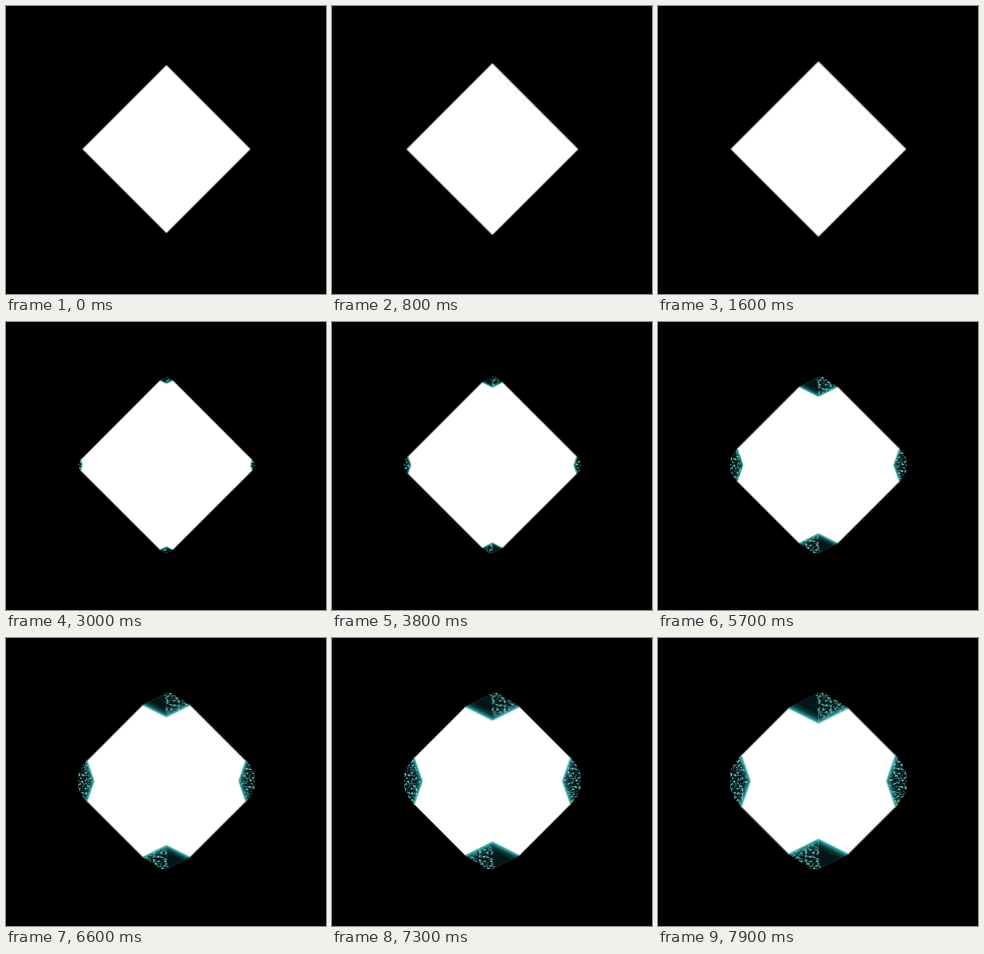
These frames come from a looping animation (320 by 288 pixels, 8000 ms). An HTML page without scripts:

```html
<!DOCTYPE html>
<html lang="en">
<head>
<meta charset="utf-8">
<title>Folding diamond</title>
<style>
  html, body { margin: 0; width: 100%; height: 100%; overflow: hidden; background: #000; }
  svg { display: block; width: 100vw; height: 100vh; }
  .diamond { fill: #fff; animation: swell 8s steps(80, end) infinite; }
  .fold { animation: fold 8s infinite; }
  .seam { fill: none; stroke: #2b8583; stroke-width: .8; stroke-dasharray: 1 2; vector-effect: non-scaling-stroke; }
  @keyframes swell { from { transform: scale(84); } to { transform: scale(103); } }
  /* corners stay sharp, then fold inwards from each tip */
  @keyframes fold {
    0% { transform: scale(0); }
    20% { transform: scale(0); animation-timing-function: steps(64, end); }
    100% { transform: scale(15.7); }
  }
</style>
</head>
<body>
<svg viewBox="0 0 320 288">
  <defs>
    <linearGradient id="glowL" gradientUnits="userSpaceOnUse" x1="-1" y1="1.5" x2="-.72" y2=".94">
      <stop offset="0" stop-color="#a5f0ee"/>
      <stop offset=".15" stop-color="#359d9b"/>
      <stop offset=".5" stop-color="#0b3f40"/>
      <stop offset="1" stop-color="#021617"/>
    </linearGradient>
    <linearGradient id="glowR" href="#glowL" x1="1" y1="1.5" x2=".72" y2=".94"/>
    <linearGradient id="glowUp" href="#glowL" x1="1.05" y1="-.875" x2=".55" y2="-.7"/>
    <linearGradient id="glowDown" href="#glowL" x1="1.05" y1=".875" x2=".55" y2=".7"/>

    <filter id="specks" x="0" y="0" width="1" height="1" color-interpolation-filters="sRGB">
      <feTurbulence type="fractalNoise" baseFrequency=".43" numOctaves="2" seed="7"/>
      <feColorMatrix values="0 1 0 0 -.08  0 .9 0 0 .24  0 .9 0 0 .24  8 0 0 0 -4"/>
    </filter>

    <clipPath id="topClip">
      <path class="fold" d="M-.15 .05 L.1 -.05 L.5 0 L.85 .28 L1.9 .97 L0 1.85Z"/>
    </clipPath>
    <clipPath id="sideClip">
      <path class="fold" d="M.72 -1.65 Q-.1 -.9 0 0 Q-.05 .95 .72 1.65 L1.2 0Z"/>
    </clipPath>

    <g id="top">
      <path d="M-2 1L-2.2 .8V-1.5H2.2V.8L2 1Z"/>
      <path d="M0 0L-2 1L0 2Z" fill="url(#glowL)"/>
      <path d="M0 0L2 1L0 2Z" fill="url(#glowR)"/>
      <path class="seam" d="M-2 1L0 0L2 1"/>
    </g>
    <g id="side">
      <path d="M.75 -1.75H-1.5V1.75H.75Z"/>
      <path d="M.75 -1.75Q.1 -.9 0 0H1.35Z" fill="url(#glowUp)"/>
      <path d="M.75 1.75Q.1 .9 0 0H1.35Z" fill="url(#glowDown)"/>
    </g>
    <g id="topSpecks" clip-path="url(#topClip)">
      <rect x="-6" y="-4" width="42" height="40" filter="url(#specks)"/>
    </g>
    <g id="sideSpecks" clip-path="url(#sideClip)">
      <rect x="-4" y="-32" width="30" height="64" filter="url(#specks)"/>
    </g>
  </defs>

  <rect width="320" height="288"/>
  <g transform="translate(160.4 143.1)">
    <path class="diamond" d="M0 -1L1 0L0 1L-1 0Z"/>
    <g transform="translate(0 -88)">
      <g class="fold"><use href="#top"/></g>
      <use href="#topSpecks"/>
    </g>
    <g transform="rotate(180) translate(0 -88)">
      <g class="fold"><use href="#top"/></g>
      <use href="#topSpecks"/>
    </g>
    <g transform="translate(-88.3 0)">
      <g class="fold"><use href="#side"/></g>
      <use href="#sideSpecks"/>
    </g>
    <g transform="rotate(180) translate(-88.3 0)">
      <g class="fold"><use href="#side"/></g>
      <use href="#sideSpecks"/>
    </g>
  </g>
</svg>
</body>
</html>
```
